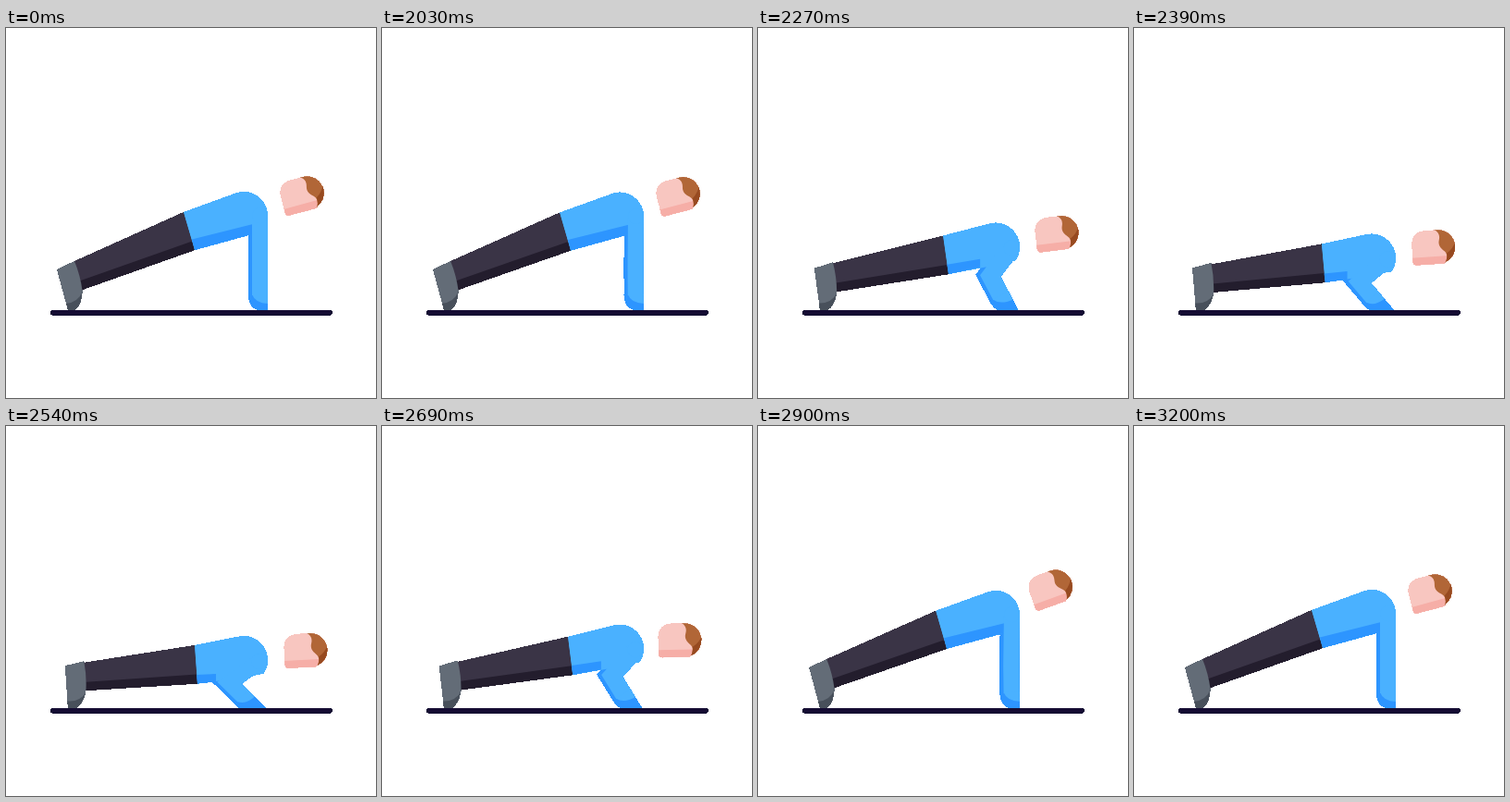
Animation of 400 by 400 pixels, one loop 3.26 s. Source, as an HTML page with a canvas:

```html
<!DOCTYPE html>
<html lang="en">
<head>
<meta charset="utf-8">
<title>Push-up</title>
<style>
html, body { margin: 0; width: 100%; height: 100%; overflow: hidden; background: #fff; }
canvas { display: block; width: 400px; height: 400px; }
</style>
</head>
<body>
<canvas id="stage" width="400" height="400"></canvas>
<script>
const ctx = document.getElementById("stage").getContext("2d", { willReadFrequently: true });
const LOOP = 3260, REST = 2000, STEP = 30, GROUND = 305;
const SHIRT = "#4ab1ff", SHIRT_DARK = "#2d95ff";
const TROUSERS = "#3a3446", TROUSERS_DARK = "#231d2d";
const SHOE = "#636c77", SHOE_DARK = "#48505b";
const SKIN = "#f8c6c0", SKIN_DARK = "#f6aea7";
const HAIR = "#b16637", HAIR_DARK = "#974a20";

const mix = (a, b, k) => a + (b - a) * k;
const progress = (t, from, to) => Math.min(1, Math.max(0, (t - from) / (to - from)));
const smooth = p => p * p * (3 - 2 * p);
const ramp = (t, from, to) => smooth(progress(t, from, to));

// Ease with early acceleration: cubic-bezier(.3, 0, .42, 1).
function easeDown(x) {
  let lo = 0, hi = 1;
  for (let i = 0; i < 20; i++) {
    const u = (lo + hi) / 2, v = 1 - u;
    if (0.9 * v * v * u + 1.26 * v * u * u + u * u * u < x) lo = u; else hi = u;
  }
  return smooth(lo);
}

function poseAt(t) {
  if (t < 2570) {
    const drop = easeDown(progress(t, REST, 2540));
    return { drop, tilt: mix(-15, -3, drop), lag: 0 };
  }
  const drop = t < 2945 ? mix(1, -0.02, ramp(t, 2570, 2945)) : mix(-0.02, 0, ramp(t, 2945, 3200));
  let tilt = mix(-3, 0, ramp(t, 2570, 2770));
  if (t > 2770) tilt = mix(0, -23, ramp(t, 2770, 2940));
  if (t > 2940) tilt = mix(-23, -15, ramp(t, 2940, 3200));
  return { drop, tilt, lag: Math.sin(Math.PI * progress(t, 2570, 2970)) };
}

function fill(color, path) {
  ctx.fillStyle = color;
  ctx.beginPath();
  path();
  ctx.closePath();
  ctx.fill();
}

function poly(color, points) {
  fill(color, () => points.forEach(p => ctx.lineTo(...p)));
}

function strokeLine(color, width, cap, points) {
  ctx.strokeStyle = color;
  ctx.lineWidth = width;
  ctx.lineCap = cap;
  ctx.lineJoin = "miter";
  ctx.beginPath();
  points.forEach(p => ctx.lineTo(...p));
  ctx.stroke();
}

function drawLegs(at) {
  const hipTop = at(192, 199, 204, 237), hipLow = at(204, 240, 207, 278.5);
  const ankle = at(81, 283.5, 85, 286);
  poly(TROUSERS, [at(73, 252.5, 83, 256), hipTop, hipLow, ankle]);
  poly(TROUSERS_DARK, [at(78, 274, 83, 277), at(201.3, 230.5, 206, 268.5), hipLow, ankle]);
}

function shoePath() {
  ctx.moveTo(55, 261);
  ctx.lineTo(74, 252);
  ctx.quadraticCurveTo(80.5, 268, 82.5, 284);
  ctx.quadraticCurveTo(82, 300, 74, 305);
  ctx.lineTo(67, 305);
}

function drawShoe(drop) {
  ctx.save();
  ctx.translate(68, GROUND);
  ctx.rotate(drop * 11.3 * Math.PI / 180);
  ctx.translate(-68, -GROUND);
  fill(SHOE, shoePath);
  ctx.beginPath();
  shoePath();
  ctx.clip();
  fill(SHOE_DARK, () => {
    ctx.moveTo(84, 282);
    ctx.quadraticCurveTo(79, 297, 64, 298);
    ctx.lineTo(64, 308);
    ctx.lineTo(86, 308);
  });
  ctx.restore();
}

function drawTorso(at, cy) {
  const hipLow = at(204, 240, 207, 278.5);
  fill(SHIRT, () => {
    ctx.moveTo(...at(192, 199, 204, 237));
    ctx.lineTo(...at(249, 178.3, 252, 227.5));
    ctx.arc(257, cy, 26, -1.8, 0.6);
    ctx.lineTo(...at(262, 224, 250, 273));
    ctx.lineTo(...hipLow);
  });
  poly(SHIRT_DARK, [
    at(201, 228.5, 206, 269), at(267, 212, 227, 268), at(267, 222.7, 227, 276.5), hipLow
  ]);
}

function armGeometry(drop, cy) {
  const bend = Math.max(0, drop);
  const width = 21 + 2.5 * Math.sin(Math.PI * bend);
  const shoulder = [272.5, cy];
  const elbow = [272.5 - 37 * bend + 3 * bend * bend, 260 + 17.5 * bend * bend];
  const hand = [272.5 - 6 * bend, GROUND];
  const angle = Math.atan2(hand[0] - elbow[0], hand[1] - elbow[1]);
  const upper = Math.atan2(elbow[0] - shoulder[0], elbow[1] - shoulder[1]);
  const wrist = [hand[0] - 16 * Math.sin(angle), hand[1] - 16 * Math.cos(angle)];
  const shift = (p, dir, d) => [p[0] + d * Math.cos(dir), p[1] - d * Math.sin(dir)];
  const half = (angle - upper) / 2;
  return {
    hand, angle, width,
    line: [shoulder, elbow, wrist],
    lit: [shift(shoulder, upper, 2), shift(elbow, (angle + upper) / 2, 2 / Math.cos(half)), shift(wrist, angle, 2)]
  };
}

function inHand(arm, draw) {
  ctx.save();
  ctx.translate(...arm.hand);
  ctx.rotate(-arm.angle);
  draw(arm.width / 2);
  ctx.restore();
}

function drawArmShade(arm) {
  strokeLine(SHIRT_DARK, arm.width, "butt", arm.line);
  inHand(arm, r => fill(SHIRT_DARK, () => {
    ctx.moveTo(-r, -17);
    ctx.lineTo(-r, -14);
    ctx.quadraticCurveTo(1 - r, -2, 0, 0);
    ctx.lineTo(r, 20);
    ctx.lineTo(r, -17);
  }));
}

function drawArmLight(arm) {
  const [shoulder] = arm.lit;
  strokeLine(SHIRT, arm.width - 4, "butt", arm.lit);
  fill(SHIRT, () => ctx.arc(...shoulder, 8.5, 0, 7));
  inHand(arm, r => fill(SHIRT, () => {
    ctx.moveTo(4 - r, -17);
    ctx.quadraticCurveTo(-3, -7.5, r, -7);
    ctx.lineTo(r, -17);
  }));
}

function headPath() {
  ctx.moveTo(-23.5, -5);
  ctx.quadraticCurveTo(-22, -18.2, -8, -18.2);
  ctx.lineTo(5, -18.2);
  ctx.arc(5, 0, 18.2, -Math.PI / 2, 1.2);
  ctx.lineTo(10, 18.3);
  ctx.lineTo(-19.5, 18.3);
  ctx.quadraticCurveTo(-23.5, 18.3, -23.5, 14.5);
}

function hairline() {
  ctx.moveTo(-1, -20);
  ctx.bezierCurveTo(6, -17, 8, -13, 6.2, -7);
  ctx.bezierCurveTo(4.5, -1, 8, 2, 11, 5);
  ctx.bezierCurveTo(15.5, 9, 13, 15, 10, 20);
}

function drawHead(pose, cy) {
  const turn = (pose.tilt + 15) * Math.PI / 180;
  const c = Math.cos(turn), s = Math.sin(turn);
  const x = 262 + 58.7 * c + 23.2 * s - 3 * pose.lag;
  const y = cy - 23.2 * c + 58.7 * s - pose.lag;
  ctx.save();
  ctx.translate(x, y);
  ctx.rotate(pose.tilt * Math.PI / 180);
  ctx.beginPath();
  headPath();
  ctx.clip();
  ctx.fillStyle = SKIN;
  ctx.fillRect(-26, -22, 52, 44);
  ctx.fillStyle = SKIN_DARK;
  ctx.fillRect(-26, 10.2, 52, 12);
  fill(HAIR, () => {
    hairline();
    ctx.lineTo(28, 20);
    ctx.lineTo(28, -20);
  });
  fill(HAIR_DARK, () => {
    ctx.moveTo(24, -5);
    ctx.quadraticCurveTo(21, 3, 13.5, 7.5);
    ctx.quadraticCurveTo(14.5, 14, 10, 20);
    ctx.lineTo(28, 20);
  });
  ctx.restore();
}

function drawGround() {
  strokeLine("#150c33", 5.5, "round", [[50.5, 307.8], [350, 307.8]]);
}

// Crisp silhouette: every pixel is either opaque or clear.
function hardenEdges() {
  const image = ctx.getImageData(0, 0, 400, 400), px = image.data;
  for (let i = 3; i < px.length; i += 4) px[i] = px[i] > 100 ? 255 : 0;
  ctx.putImageData(image, 0, 0);
}

function draw(t) {
  const pose = poseAt(t);
  const at = (x0, y0, x1, y1) => [mix(x0, x1, pose.drop), mix(y0, y1, pose.drop)];
  const cy = 203 + 50 * pose.drop;
  const arm = armGeometry(pose.drop, cy);

  ctx.clearRect(0, 0, 400, 400);
  ctx.save();
  ctx.beginPath();
  ctx.rect(0, 0, 400, GROUND);
  ctx.clip();
  drawLegs(at);
  drawShoe(pose.drop);
  drawArmShade(arm);
  drawTorso(at, cy);
  drawArmLight(arm);
  drawHead(pose, cy);
  ctx.restore();
  drawGround();
  hardenEdges();
}

const start = performance.now();
let shown = -1;
function tick() {
  const t = (performance.now() - start) % LOOP;
  const moment = Math.min(3200, REST + Math.floor(Math.max(0, t - REST) / STEP) * STEP);
  if (moment !== shown) draw(shown = moment);
  requestAnimationFrame(tick);
}
tick();
</script>
</body>
</html>
```
